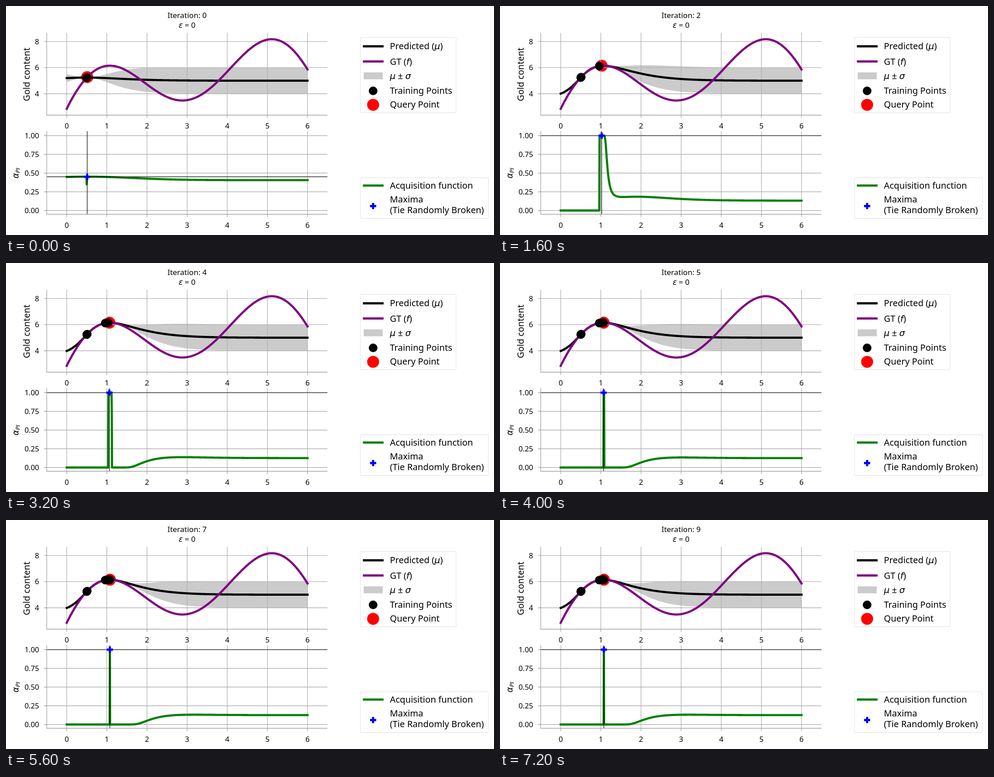
An HTML page for the animation above (8000 ms loop, 1090 by 514 pixels).

```html
<!DOCTYPE html>
<html lang="en">
<head>
<meta charset="utf-8">
<title>Probability of improvement</title>
<style>
  html, body { margin: 0; width: 100%; height: 100%; overflow: hidden; background: #fff; }
  svg { display: block; width: 1090px; height: 514px; }
  text { font-family: "Noto Sans", "Open Sans", sans-serif; font-size: 19.85px; fill: #000; }
  .tick { font-size: 16.4px; }
  .title { font-size: 17px; }
  .math { font-family: "DejaVu Sans", sans-serif; font-style: italic; }
  .curve { fill: none; stroke-width: 4.8; stroke-linecap: square; stroke-linejoin: round; }
  .grid { fill: none; stroke: #b0b0b0; stroke-width: 1.3; }
  .spine { fill: none; stroke: #a0a0a0; stroke-width: 1.3; }
  .cross { fill: none; stroke: #000; stroke-width: 1.2; }
  .box { fill: #fff; stroke: #e8e8e8; stroke-width: 1.3; }
</style>
</head>
<body>
<svg id="stage" viewBox="0 0 1090 514" xmlns="http://www.w3.org/2000/svg"></svg>
<script>
const STEP_MS = 800, SAMPLES = 1000;
const LEFT = 91, RIGHT = 718;
const px = x => 135.6 + 89.65 * x;
const pyTop = v => 197 - 29.33 * (v - 4);
const pyLow = v => 459 - 168 * v;
const gridX = i => i * 6 / (SAMPLES - 1);
const xs = Array.from({ length: SAMPLES }, (_, i) => gridX(i));

// Ground truth: Newton polynomial; a repeated knot has zero slope.
const knots = [[0, 2.85], [0.5, 5.24], [1.0735, 6.15], [1.0735, 6.15], [2.88, 3.485],
  [2.88, 3.485], [5.11, 8.175], [5.11, 8.175], [6, 5.86]];
const coef = knots.map(k => k[1]);
for (let order = 1; order < knots.length; order++) {
  for (let i = knots.length - 1; i >= order; i--) {
    const dx = knots[i][0] - knots[i - order][0];
    coef[i] = dx ? (coef[i] - coef[i - 1]) / dx : 0;
  }
}
const truth = x => coef.reduceRight((sum, c, i) => sum * (x - knots[i][0]) + c, 0);

// Gaussian process with a Matern 5/2 kernel and prior mean 5.
const PRIOR = 5;
function kernel(a, b) {
  const s = Math.sqrt(5) * Math.abs(a - b);
  return (1 + s + s * s / 3) * Math.exp(-s);
}
function forwardSolve(L, b) {
  const out = [];
  for (let i = 0; i < b.length; i++) {
    let sum = b[i];
    for (let j = 0; j < i; j++) sum -= L[i][j] * out[j];
    out.push(sum / L[i][i]);
  }
  return out;
}
function cholesky(pts) {
  const L = pts.map(() => []);
  for (let i = 0; i < pts.length; i++) {
    for (let j = 0; j <= i; j++) {
      let sum = kernel(pts[i], pts[j]) + (i === j ? 1e-12 : 0);
      for (let k = 0; k < j; k++) sum -= L[i][k] * L[j][k];
      L[i][j] = i === j ? Math.sqrt(Math.max(sum, 1e-14)) : sum / L[j][j];
    }
  }
  return L;
}
const dot = (a, b) => a.reduce((sum, v, i) => sum + v * b[i], 0);
function fit(pts) {
  const L = cholesky(pts);
  const w = forwardSolve(L, pts.map(p => truth(p) - PRIOR));
  return x => {
    const v = forwardSolve(L, pts.map(p => kernel(x, p)));
    return { mean: PRIOR + dot(v, w), spread: Math.max(1 - dot(v, v), 1e-9) };
  };
}
function normalCdf(z) {
  const t = 1 / (1 + 0.2316419 * Math.abs(z));
  const poly = t * (0.31938153 + t * (-0.356563782 + t * (1.781477937 + t * (-1.821255978 + t * 1.330274429))));
  const tail = 0.3989422804 * Math.exp(-z * z / 2) * poly;
  return z > 0 ? 1 - tail : tail;
}

const queries = [85, 160, 170, 172, 177, 178, 179, 179, 179, 179];

// SVG helpers
const line = pts => "M" + pts.map(p => p[0].toFixed(2) + " " + p[1].toFixed(2)).join("L");
const path = (cls, d, extra = "") => `<path class="${cls}" d="${d}" ${extra}/>`;
const curve = (ys, scale, color) =>
  path("curve", line(ys.map((y, i) => [px(xs[i]), scale(y)])), `stroke="${color}"`);
const circle = (x, y, r, color) => `<circle cx="${x}" cy="${y}" r="${r}" fill="${color}"/>`;
const text = (x, y, s, cls = "", extra = "") => `<text class="${cls}" x="${x}" y="${y}" ${extra}>${s}</text>`;
const math = s => `<tspan class="math">${s}</tspan>`;
const plus = (x, y) =>
  `<path fill="#00f" d="M${x - 2.4} ${y - 7}h4.8v4.6h4.6v4.8h-4.6v4.6h-4.8v-4.6h-4.6v-4.8h4.6z"/>`;
const middle = 'text-anchor="middle"', end = 'text-anchor="end"';

function axes(top, bottom, ticks, scale, digits) {
  let grid = "", marks = "", labels = "";
  for (let x = 0; x <= 6; x++) {
    grid += `M${px(x)} ${top}V${bottom}`;
    marks += `M${px(x)} ${bottom}v6`;
    labels += text(px(x), bottom + 30.3, x, "tick", middle);
  }
  for (const v of ticks) {
    grid += `M${LEFT} ${scale(v)}H${RIGHT}`;
    marks += `M${LEFT} ${scale(v)}h-6`;
    labels += text(74, scale(v) + 6, v.toFixed(digits), "tick", end);
  }
  return {
    grid: path("grid", grid),
    frame: path("spine", `M${LEFT} ${top}V${bottom}H${RIGHT}` + marks) + labels
  };
}
const upper = axes(60, 245, [4, 6, 8], pyTop, 0);
const lower = axes(281, 467.5, [0, 0.25, 0.5, 0.75, 1], pyLow, 2);

const sample = (y, color) => path("curve", `M799.5 ${y}H841`, `stroke="${color}"`);
const labels =
  text(0, 0, "Gold content", "", `transform="translate(52.5 153.5) rotate(-90)" ${middle}`) +
  text(0, 0, `α<tspan font-size="13" dy="3.5">PI</tspan>`, "math",
    `transform="translate(27.5 375) rotate(-90)" style="font-size:18.5px" ${middle}`) +
  `<rect class="box" x="791.5" y="70.5" width="214" height="169" rx="3"/>` +
  sample(90.5, "#000") + text(857.5, 97, `Predicted (${math("μ")})`) +
  sample(124.5, "purple") + text(857.5, 131.5, `GT (${math("f")})`) +
  `<rect x="799" y="149" width="42.5" height="15.5" fill="#cbcbcb"/>` +
  text(857.5, 164, `${math("μ")} ± ${math("σ")}`) +
  circle(820, 190.5, 9.7, "#000") + text(857.5, 197, "Training Points") +
  circle(820, 221.8, 13.4, "red") + text(857.5, 228, "Query Point") +
  `<rect class="box" x="791.5" y="385.5" width="286" height="91.5" rx="3"/>` +
  sample(403, "green") + text(857.5, 410, "Acquisition function") +
  plus(820, 449) + text(857.5, 440.5, "Maxima") + text(857.5, 464.5, "(Tie Randomly Broken)");

const truthCurve = curve(xs.map(truth), pyTop, "purple");

function draw(iteration) {
  const pts = [0.5, ...[...new Set(queries.slice(0, iteration))].map(gridX)];
  const best = Math.max(...pts.map(truth));
  const post = xs.map(fit(pts));
  const gain = post.map(p => normalCdf((p.mean - best - 1e-6) / p.spread));
  const pick = queries[iteration];
  if (iteration) gain[pick] = 1;
  const qx = px(gridX(pick)), qy = pyLow(gain[pick]);

  const edge = sign => post.map((p, i) => [px(xs[i]), pyTop(p.mean + sign * p.spread)]);
  const band = line(edge(1).concat(edge(-1).reverse())) + "Z";

  return text(404.5, 27, `Iteration: ${iteration}`, "title", middle) +
    text(404.5, 48.5, `${math("ε")} = 0`, "title", middle) +
    `<path d="${band}" fill="#cbcbcb"/>` +
    circle(qx, pyTop(truth(gridX(pick))), 13.4, "red") +
    upper.grid + curve(post.map(p => p.mean), pyTop, "#000") + truthCurve +
    pts.map(p => circle(px(p), pyTop(truth(p)), 9.7, "#000")).join("") + upper.frame +
    lower.grid + curve(gain, pyLow, "green") +
    path("cross", `M${qx} 281V467.5M${LEFT} ${qy}H${RIGHT}`) +
    plus(qx, qy) + lower.frame + labels;
}

const stage = document.getElementById("stage");
const scenes = queries.map((_, i) => draw(i));
const start = performance.now();
let shown = -1;
function tick() {
  const step = Math.floor(Math.max(0, performance.now() - start) / STEP_MS) % scenes.length;
  if (step !== shown) stage.innerHTML = scenes[shown = step];
  requestAnimationFrame(tick);
}
tick();
</script>
</body>
</html>
```
